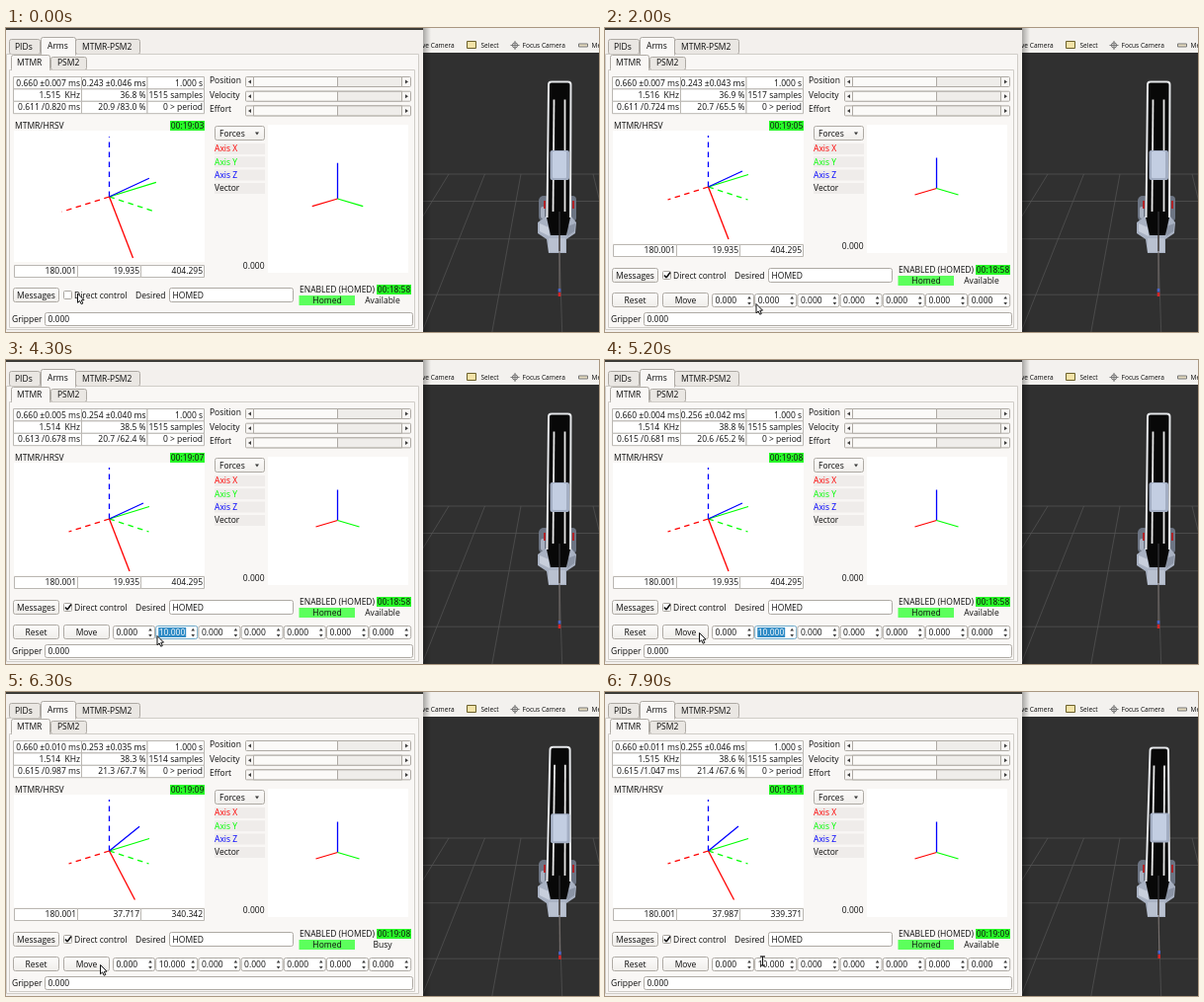
These frames come from a looping animation (600 by 308 pixels, 8 s). An HTML page with a canvas:

```html
<!DOCTYPE html>
<html lang="en">
<head>
<meta charset="utf-8">
<title>Arm control panel</title>
<style>
html, body { margin: 0; width: 100%; height: 100%; overflow: hidden; background: #303030; }
canvas { display: block; width: 600px; height: 308px; }
</style>
</head>
<body>
<canvas id="stage"></canvas>
<script>
const LOOP = 8000;
const cv = document.getElementById('stage');
const dpr = window.devicePixelRatio || 1;
cv.width = 600 * dpr;
cv.height = 308 * dpr;
const c = cv.getContext('2d');
const RED = '#ff0000', GREEN = '#00ff00', BLUE = '#0000ff', INK = '#0c0c0c';
const BG = '#f3f0ed', PANE = '#f9f7f5', TAB = '#eae7e3', EDGE = '#aeaaa4';

const clamp = v => Math.max(0, Math.min(1, v));
const mix = (a, b, p) => a + (b - a) * p;
const ease = (t, a, b) => { const u = clamp((t - a) / (b - a)); return u * u * (3 - 2 * u); };

// Latest row whose start time has passed
const at = (rows, t) => rows.filter(r => r[0] <= t).pop();

function rect(x, y, w, h, fill, stroke, r = 0) {
  c.beginPath();
  if (r) c.roundRect(x, y, w, h, r); else c.rect(x, y, w, h);
  if (fill) { c.fillStyle = fill; c.fill(); }
  if (stroke) { c.strokeStyle = stroke; c.lineWidth = 1; c.stroke(); }
}

function line(x1, y1, x2, y2, color, w = 1, dash = []) {
  c.beginPath();
  c.setLineDash(dash);
  c.moveTo(x1, y1);
  c.lineTo(x2, y2);
  c.strokeStyle = color;
  c.lineWidth = w;
  c.stroke();
  c.setLineDash([]);
}

function poly(pts, fill, stroke, w = 1) {
  c.beginPath();
  pts.forEach(([x, y]) => c.lineTo(x, y));
  c.closePath();
  if (fill) { c.fillStyle = fill; c.fill(); }
  if (stroke) { c.strokeStyle = stroke; c.lineWidth = w; c.stroke(); }
}

function text(s, x, cy, align = 'left', color = INK, size = 8.5) {
  c.font = '500 ' + size + 'px "Open Sans", "Noto Sans", sans-serif';
  c.textAlign = align;
  c.fillStyle = color;
  c.fillText(s, x, cy + size * 0.36);
}

function button(label, x, y, w, h, down) {
  const g = c.createLinearGradient(0, y, 0, y + h);
  g.addColorStop(0, down ? '#cfccc8' : '#fdfcfb');
  g.addColorStop(1, down ? '#dedbd8' : '#efedea');
  rect(x + .5, y + .5, w - 1, h - 1, g, EDGE, 2);
  if (label) text(label, x + w / 2, y + h / 2, 'center');
}

function field(x, y, w, h, value, edge = EDGE) {
  rect(x + .5, y + .5, w - 1, h - 1, '#fff', edge, 2);
  text(value, x + 3.5, y + h / 2);
}

function table(x, y, cols, rowH, rows) {
  rows.forEach((row, r) => {
    let cx = x;
    cols.forEach((w, i) => {
      rect(cx + .5, y + r * rowH + .5, w, rowH, '#fff', '#bab7b2');
      text(row[i], cx + w - 1, y + r * rowH + rowH / 2 + .4, 'right');
      cx += w;
    });
  });
}

function triangle(x, y, dx, dy, s = 2) {
  poly([[x + dx * s, y + dy * s], [x - dx * s / 2 + dy * s, y - dy * s / 2 + dx * s],
        [x - dx * s / 2 - dy * s, y - dy * s / 2 - dx * s]], '#3c3c3c');
}

const STATS = [
  [0, '0.660 ±0.007 ms', '0.243 ±0.046 ms', '1.515  KHz', '36.8 %', '1515', '0.611 /0.820 ms', '20.9 /83.0 %'],
  [1000, '0.660 ±0.007 ms', '0.243 ±0.043 ms', '1.516  KHz', '36.9 %', '1517', '0.611 /0.724 ms', '20.7 /65.5 %'],
  [2900, '0.660 ±0.005 ms', '0.252 ±0.037 ms', '1.515  KHz', '38.2 %', '1516', '0.612 /0.675 ms', '20.8 /59.6 %'],
  [4000, '0.660 ±0.005 ms', '0.254 ±0.040 ms', '1.514  KHz', '38.5 %', '1515', '0.613 /0.678 ms', '20.7 /62.4 %'],
  [5000, '0.660 ±0.004 ms', '0.256 ±0.042 ms', '1.514  KHz', '38.8 %', '1515', '0.615 /0.681 ms', '20.6 /65.2 %'],
  [5900, '0.660 ±0.010 ms', '0.253 ±0.035 ms', '1.514  KHz', '38.3 %', '1514', '0.615 /0.987 ms', '21.3 /67.7 %'],
  [6900, '0.660 ±0.011 ms', '0.255 ±0.046 ms', '1.515  KHz', '38.6 %', '1515', '0.615 /1.047 ms', '21.4 /67.6 %']
];

function drawScene(t) {
  const top = 25;
  rect(421, 0, 179, top, '#f3f1ee');
  rect(421, top, 179, 308 - top, '#303030');
  // Floor grid in perspective, horizon above the view
  const vx = 552, vy = -22, far = 170;
  for (let i = -6; i <= 3; i++) {
    const x = 521 + i * 36.5, k = (308 - vy) / far;
    line(x, vy + far, vx + (x - vx) * k, 308, '#565656', .7);
  }
  for (let i = 0; i < 4; i++) {
    const y = vy + 1 / (1 / far - i * .00082);
    line(421, y, 600, y, '#565656', .7);
  }

  text('ve Camera', 421, 17.3, 'left', INK, 6.6);
  rect(466.5, 13.5, 9, 7, '#f3e3a8', '#6b5f2a');
  text('Select', 480.5, 17.3, 'left', INK, 6.6);
  c.beginPath();
  c.arc(515, 17.5, 2.6, 0, 7);
  c.strokeStyle = '#666';
  c.lineWidth = 1;
  c.stroke();
  line(510.5, 17.5, 519.5, 17.5, '#777');
  line(515, 13, 515, 22, '#777');
  text('Focus Camera', 522.5, 17.3, 'left', INK, 6.6);
  rect(579.5, 16, 9, 3, '#e6dcc0', '#777');
  text('Measure', 592.5, 17.3, 'left', INK, 6.6);
  drawRobot(ease(t, 5800, 6700));
}

function drawRobot(p) {
  const l = mix(548, 550.5, p), r = mix(572.5, 571, p), top = mix(53.5, 55.5, p);
  // Base and side lobes
  rect(539, 170, 11, 26, '#6d7584', null, 5);
  rect(569, 170, 8, 26, '#6d7584', null, 4);
  rect(541, 181, 4, 12, '#a9b2c2', null, 2);
  rect(544, 175, 2, 8, '#b02328');
  rect(573, 175, 2, 8, '#b02328');
  poly([[538, 197], [546, 191], [572, 191], [577, 197], [576, 208], [567, 214], [567, 228], [549, 228], [547, 214], [538, 208]], '#a9b2c3');
  poly([[540, 198], [549, 202], [550, 211], [540, 206]], '#c8cfdc');
  poly([[568, 201], [576, 198], [575, 206], [568, 211]], '#8b94a5');
  rect(549, 213, 17, 14, '#b9c1d0');
  // Column
  poly([[l + 3, top], [r - 3, top], [r, top + 4], [571, 192], [567, 210], [551, 210], [547, 192], [l, top + 4]], '#080808');
  c.beginPath();
  c.moveTo(547.5, 192);
  c.lineTo(l + 1, top + 4);
  c.quadraticCurveTo(l + 1, top + 1, l + 4, top + 1);
  c.lineTo(r - 4, top + 1);
  c.quadraticCurveTo(r - 1, top + 1, r - 1, top + 4);
  c.lineTo(571, 192);
  c.strokeStyle = '#e8eaed';
  c.lineWidth = 2;
  c.stroke();
  const rail = '#e8e8e8';
  line(mix(554.5, 555.5, p), top + 19, 553.5, 186, rail, 1.8);
  line(mix(565.5, 566, p), top + 19, 565.5, 186, rail, 1.8);
  const by = mix(124, 122.5, p);
  rect(mix(550.5, 551.5, p), by, 19.5, 30, '#a3aec3', null, 2);
  rect(mix(553, 554, p), by + 1, 14, 27, '#c3cee2', null, 1);
  // Instrument
  const tip = mix(264, 262, p), tx = mix(560, 560.7, p);
  line(560, 186, 560, 226, '#2a2a2c', 1.8);
  line(560, 210, tx, tip, '#77706e', 1.1);
  rect(tx - 1.3, tip, 2.6, 3.5, '#4b64c8');
  rect(tx - 1.3, tip + 4, 2.6, 4, '#d42626');
}

function drawPlots(open, t) {
  const h = open ? 114 : 133, s = open ? 1 : 1.17, m = ease(t, 5800, 6339);
  const cy = open ? 161 : 171;
  rect(8, 104, 193, h, '#fff');
  const ray = (x, y, col, dash) => line(104.5, cy, 104.5 + x * s, cy + y * s, col, 1.3, dash ? [5.5, 4.5] : []);
  ray(0, -52, BLUE, true);
  ray(-41, 13, RED, true);
  ray(40, 13, GREEN, true);
  ray(40.5, -12.5, GREEN);
  ray(mix(20.5, 26, m), mix(53, 49.5, m), RED);
  ray(mix(34.5, 30.5, m), mix(-16, -25, m), BLUE);
  table(8, open ? 219 : 240, [64, 64, 64], 12,
    [['180.001', mix(19.935, 37.987, m).toFixed(3), mix(404.295, 339.371, m).toFixed(3)]]);

  rect(265, 98, 142, open ? 130 : 150, '#fff');
  const fy = open ? 162.5 : 173;
  [[0, -31, BLUE], [-22, 6.5, RED], [22, 6.5, GREEN]].forEach(
    ([x, y, col]) => line(335.5, fy, 335.5 + x * s, fy + y * s, col, 1.3));
}

function drawPanel(t, open) {
  const shade = c.createLinearGradient(421, 0, 430, 0);
  shade.addColorStop(0, 'rgba(0,0,0,.35)');
  shade.addColorStop(1, 'rgba(0,0,0,0)');
  rect(421, 0, 9, 308, shade);
  rect(0, 0, 422, 308, BG);
  rect(0, 0, 422, 2, '#3c3b37');

  // Tabs
  rect(3.5, 11.5, 31, 15, TAB, EDGE, 2);
  rect(70.5, 11.5, 65, 15, TAB, EDGE, 2);
  rect(.5, 26.5, 417, 279, PANE, '#d0cdc8');
  rect(35.5, 9.5, 35, 19, PANE, EDGE, 2);
  rect(36, 26, 34, 3, PANE);
  text('PIDs', 9, 18.5);
  text('Arms', 42, 18.2);
  text('MTMR-PSM2', 77, 18.5);
  rect(45.5, 29.5, 36, 13, TAB, EDGE, 2);
  rect(3.5, 42.5, 410, 261, PANE, '#d0cdc8');
  rect(5.5, 27.5, 39, 16, PANE, EDGE, 2);
  rect(6, 41, 38, 4, PANE);
  text('MTMR', 11, 35.2);
  text('PSM2', 52, 35.3);

  const s = at(STATS, t);
  table(7, 49, [69, 66.5, 57.5], 12.4, [
    [s[1], s[2], '1.000 s'],
    [s[3], s[4], s[5] + ' samples'],
    [s[6], s[7], '0 > period']
  ]);

  ['Position', 'Velocity', 'Effort'].forEach((name, i) => {
    const y = 49 + i * 14.7;
    text(name, 206, y + 4);
    rect(242.5, y + .5, 167, 10, '#f8f6f4', EDGE, 1);
    rect(250.5, y + .5, 85, 10, '#fbfaf8', EDGE);
    rect(335.5, y + .5, 65, 10, '#efedea', EDGE);
    triangle(247, y + 5.5, -1, 0);
    triangle(405, y + 5.5, 1, 0);
  });

  text('MTMR/HRSV', 9, 99);
  rect(166, 94, 35, 10, '#28fa28');
  const sec = 3 + Math.floor((t + 100) / 1000);
  text('00:19:' + String(sec).padStart(2, '0'), 183.5, 99, 'center');

  button('', 211, 99, 51, 15);
  text('Forces', 216, 106.5);
  triangle(254, 106.5, 0, 1);
  [['Axis X', RED], ['Axis Y', GREEN], ['Axis Z', BLUE], ['Vector', INK]].forEach(([name, col], i) => {
    rect(211, 117 + i * 13.3, 51, 11, '#efecea');
    text(name, 211, 122.3 + i * 13.3, 'left', col);
  });
  drawPlots(open, t);
  text('0.000', 261.5, open ? 221 : 241, 'right');
}

function drawControls(t, open) {
  const y = open ? 251 : 271;
  button('Messages', 7, y - 8, 47, 15);
  rect(58.5, y - 4.5, 8, 8, '#fff', '#aaa6a0', 1);
  if (t >= 700) {
    line(60, y - .5, 62, y + 2, INK, 1.5);
    line(62, y + 2, 66, y - 3.5, INK, 1.5);
  }
  text('Direct control', 69, y - .5);
  text('Desired', 131, y);
  field(165, y - 8, 126, 15, 'HOMED');

  const busy = t >= 5700 && t < 6500;
  text('ENABLED (HOMED)', 297, y - 6);
  rect(375, y - 11, 35, 10, '#28fa28');
  text(t < 5700 ? '00:18:58' : busy ? '00:19:08' : '00:19:09', 392.5, y - 6, 'center');
  rect(296.5, y, 56.5, 10, '#5cff5c');
  text('Homed', 325, y + 5, 'center');
  text(busy ? 'Busy' : 'Available', 381, y + 5, 'center');

  if (open) {
    button('Reset', 7, 268, 47, 15);
    button('Move', 58, 268, 47, 15, t >= 5500 && t < 5700);
    for (let i = 0; i < 7; i++) drawSpin(i, t);
  }
  text('Gripper', 6, 295);
  field(39, 288, 373, 14, '0.000');
}

function drawSpin(i, t) {
  const x = 108 + i * 43.2, on = i === 1, focus = on && t >= 2900 && t < 5500;
  const value = on && t >= 3300 ? '10.000' : '0.000';
  field(x, 269, 43, 14, value, focus ? '#6fa9c8' : EDGE);
  if (focus && t >= 4200) {
    rect(x + 3, 271, 28, 10, '#308cc6');
    text(value, x + 3.5, 276, 'left', '#fff');
  } else if (focus) {
    const cx = x + (t < 3300 ? 3.5 : 8.7);
    line(cx, 271.5, cx, 281, '#111', 1);
  }
  triangle(x + 38, 273.5, 0, -1, 1.8);
  triangle(x + 38, 278.8, 0, 1, 1.8);
}

function drawPointer(t) {
  const a = ease(t, 1400, 2000), b = ease(t, 4600, 5200), d = ease(t, 6900, 7700);
  const x = mix(mix(mix(72.5, 153, a), 95.5, b), 159.5, d);
  const y = mix(mix(mix(269, 279.5, a), 276.5, b), 272, d) + 5 * Math.sin(Math.PI * b);
  if (d > .9) {
    line(x, y - 4, x, y + 5, '#fff', 3);
    line(x, y - 4, x, y + 5, '#111', 1.2);
    line(x - 2.5, y - 4, x + 2.5, y - 4, '#111', 1.2);
    line(x - 2.5, y + 5, x + 2.5, y + 5, '#111', 1.2);
    return;
  }
  const tip = [[0, 0], [0, 9.3], [2.1, 7.4], [3.7, 10.7], [5.3, 10], [3.8, 6.8], [6.5, 6.6]];
  poly(tip.map(([px, py]) => [x + px, y + py]), '#fff', '#111', 1);
}

function draw(now) {
  const t = Math.floor((now % LOOP) / 100) * 100;
  const open = t >= 900;
  c.setTransform(dpr, 0, 0, dpr, 0, 0);
  drawScene(t);
  drawPanel(t, open);
  drawControls(t, open);
  drawPointer(t);
}

const start = performance.now();
function tick() {
  draw(performance.now() - start);
  requestAnimationFrame(tick);
}
tick();
</script>
</body>
</html>
```
